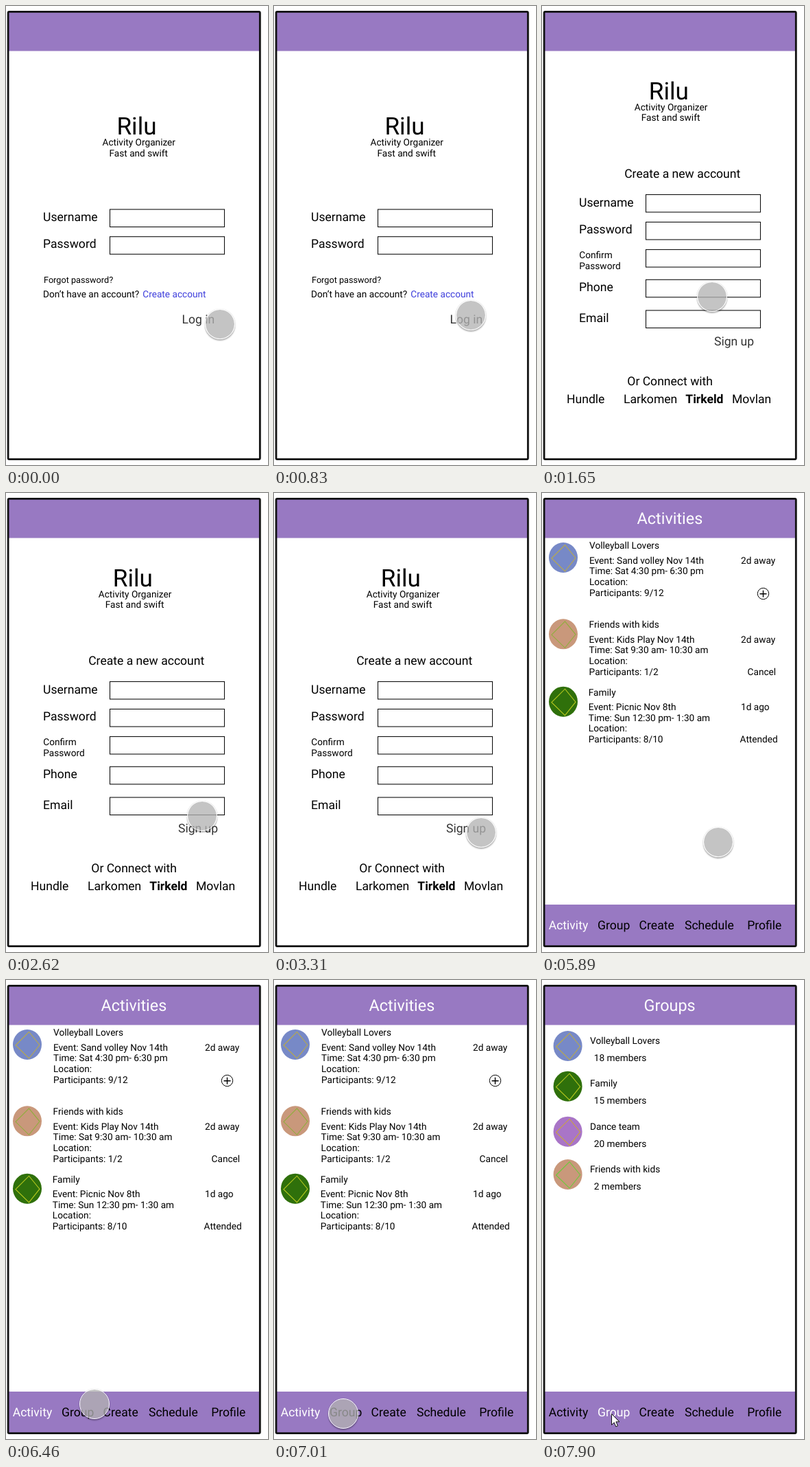
An HTML page that plays this animation: 382 px wide and 668 px high, repeating every 8 s.

```html
<!DOCTYPE html>
<html lang="en">
<head>
<meta charset="utf-8">
<title>Activity organizer walkthrough</title>
<style>
  html, body { margin: 0; width: 100%; height: 100%; overflow: hidden; background: #fff; }
  svg { position: absolute; left: 0; top: 0; display: block; }
  text { font-family: Roboto, Arial, sans-serif; white-space: pre; text-rendering: geometricPrecision; }
  #touch {
    position: absolute; left: -22px; top: -22px; width: 44px; height: 44px;
    box-sizing: border-box; border: 1px solid #fff; border-radius: 50%;
    background: rgba(178, 178, 178, .765) padding-box;
    box-shadow: 0 0 1px rgba(0, 0, 0, .35), 0 2px 2px rgba(0, 0, 0, .3);
  }
  #touch.pressed { box-shadow: 0 0 1px rgba(0, 0, 0, .35); }
</style>
</head>
<body>
<svg id="stage" width="382" height="668" viewBox="0 0 382 668"></svg>
<div id="touch"></div>
<script>
const LOOP = 8000;
const PURPLE = '#9879c2';
const XS = 12.7, S = 13.66, M = 17.57, L = 23.4, XL = 35.1;
const stage = document.getElementById('stage');
const touch = document.getElementById('touch');

function add(parent, tag, attrs, content) {
  const node = document.createElementNS('http://www.w3.org/2000/svg', tag);
  for (const key in attrs) node.setAttribute(key, attrs[key]);
  if (content) node.textContent = content;
  return parent.appendChild(node);
}

const group = () => add(stage, 'g', {});
const label = (g, x, y, size, text, fill = '#000', weight = 400) =>
  add(g, 'text', { x, y, 'font-size': size, fill, 'font-weight': weight }, text);
const bar = (g, y, height) => add(g, 'rect', { x: 4, y, width: 366, height, fill: PURPLE });
const field = (g, y) => add(g, 'rect', {
  x: 151.5, y, width: 167, height: 25.5, fill: '#fff', stroke: '#111', 'stroke-width': 1.1
});

function avatar(g, x, y, fill, line) {
  const a = add(g, 'g', { transform: `translate(${x} ${y})` });
  add(a, 'ellipse', { rx: 21, ry: 22, fill });
  add(a, 'path', { d: 'M-17 1L2.5-18.5L18 .5L2.5 20Z', fill: 'none', stroke: line, 'stroke-width': 1.1 });
}

function brand(g, x, y) {
  label(g, x, y, XL, 'Rilu');
  label(g, x - 21, y + 16, S, 'Activity Organizer');
  label(g, x - 11, y + 31.7, S, 'Fast and swift');
}

function navBar(g, active) {
  bar(g, 599, 60);
  [['Activity', 9.7], ['Group', 81], ['Create', 141.6], ['Schedule', 208], ['Profile', 299.2]]
    .forEach(([name, x]) => label(g, x, 635, M, name, name === active ? '#fff' : '#000'));
}

function login() {
  const g = group();
  brand(g, 161.5, 187);
  label(g, 54, 313, M, 'Username');
  label(g, 54, 352, M, 'Password');
  field(g, 296);
  field(g, 335.7);
  label(g, 55, 402.7, XS, 'Forgot password?');
  label(g, 54, 424, S, 'Don’t have an account?');
  label(g, 199.3, 424, S, 'Create account', '#3f3fdc');
  label(g, 256.6, 462, M, 'Log in', '#333');
  return g;
}

function signUp() {
  const g = group();
  brand(g, 155.8, 135.5);
  label(g, 120.2, 250, M, 'Create a new account');
  [['Username', 292, 274.5], ['Password', 331, 314.5], ['', 0, 354.5], ['Phone', 415, 398.3], ['Email', 459.5, 443]]
    .forEach(([name, y, top]) => { label(g, 54, y, M, name); field(g, top); });
  label(g, 54.3, 367, S, 'Confirm');
  label(g, 54.3, 382.5, S, 'Password');
  label(g, 251, 493.7, M, 'Sign up', '#333');
  label(g, 124.3, 552, M, 'Or Connect with');
  label(g, 36, 578.3, M, 'Hundle');
  label(g, 119, 578.3, M, 'Larkomen');
  label(g, 209.3, 578.3, M, 'Tirkeld', '#000', 700);
  label(g, 277, 578.3, M, 'Movlan');
  return g;
}

function activities() {
  const g = group();
  const entry = (x, y, gap, name, lines, when) => {
    label(g, x, y, S, name);
    lines.forEach((text, i) => label(g, x, y + gap + i * 15.6, S, text));
    label(g, 290, y + gap, S, when);
  };
  label(g, 138.6, 44.5, L, 'Activities', '#fff');
  avatar(g, 31, 94, '#7789c7', '#b9a94a');
  avatar(g, 31, 205.3, '#c9987b', '#8fae3c');
  avatar(g, 31, 303.7, '#2f700b', '#b5c81e');
  entry(69, 81, 21.7, 'Volleyball Lovers',
    ['Event: Sand volley Nov 14th', 'Time: Sat 4:30 pm- 6:30 pm', 'Location:', 'Participants: 9/12'], '2d away');
  entry(68.6, 196, 21.7, 'Friends with kids',
    ['Event: Kids Play Nov 14th', 'Time: Sat 9:30 am- 10:30 am', 'Location:', 'Participants: 1/2'], '2d away');
  entry(67.8, 295, 21.2, 'Family',
    ['Event: Picnic Nov 8th', 'Time: Sun 12:30 pm- 1:30 am', 'Location:', 'Participants: 8/10'], '1d ago');
  label(g, 299.6, 264.5, S, 'Cancel');
  label(g, 288.6, 363, S, 'Attended');
  add(g, 'circle', { cx: 322.5, cy: 146.5, r: 8.2, fill: 'none', stroke: '#000' });
  add(g, 'path', { d: 'M317.5 146.8h10M322.5 141.8v10', stroke: '#000', 'stroke-width': 1.4 });
  navBar(g, 'Activity');
  return g;
}

function groups() {
  const g = group();
  const entry = (y, name, count, cy, fill, line) => {
    avatar(g, 37.6, cy, fill, line);
    label(g, 70, y, S, name);
    label(g, 75.8, y + 25.3, S, `${count} members`);
  };
  label(g, 148.6, 45.3, L, 'Groups', '#fff');
  entry(93, 'Volleyball Lovers', 18, 96, '#7789c7', '#b9a94a');
  entry(154.5, 'Family', 15, 154.7, '#2f700b', '#b5c81e');
  entry(217.7, 'Dance team', 20, 220.7, '#a975c7', '#c9a63c');
  entry(280, 'Friends with kids', 2, 283, '#c9987b', '#6ccb3c');
  navBar(g, 'Group');
  add(g, 'path', {
    d: 'M101.5 631.5v16l3.7-3.5l2.6 6l2.7-1.1l-2.6-6h5Z', fill: '#fff', stroke: '#111', 'stroke-linejoin': 'round'
  });
  return g;
}

bar(stage, 9, 56.5);
const screens = [[0, login()], [1650, signUp()], [4010, activities()], [7900, groups()]];
add(stage, 'rect', {
  x: 3.1, y: 8.4, width: 367.2, height: 651.2, rx: 1.5, fill: 'none', stroke: '#111', 'stroke-width': 2.8
});

// Pointer stops: time, x, y; each holds until the next.
const stops = [
  [0, 312, 463], [130, 322, 474], [250, 332, 484], [400, 346, 501], [550, 337, 491], [680, 318, 469],
  [830, 287, 450], [950, 259, 432], [1100, 249, 424], [1250, 248, 423],
  [2620, 286, 470], [2740, 320, 511], [2890, 321, 513], [3010, 319, 510], [3160, 311, 501],
  [3310, 302, 494], [3430, 297, 492], [3580, 297, 491],
  [5890, 257, 508], [6040, 220, 532], [6190, 188, 559], [6310, 157, 586],
  [6460, 129, 617], [6590, 107, 641], [6740, 99, 643], [6890, 96, 638], [7010, 101, 631]
];
const presses = [[1500, 1650], [7750, 7900]];

const current = (list, t) => list.filter(item => item[0] <= t).pop();

function draw(t) {
  const shown = current(screens, t)[1];
  screens.forEach(([, g]) => g.setAttribute('visibility', g === shown ? 'visible' : 'hidden'));
  const [, x, y] = current(stops, t);
  touch.style.transform = `translate(${x}px, ${y}px)`;
  touch.style.visibility = t < 7900 ? 'visible' : 'hidden';
  touch.classList.toggle('pressed', presses.some(([from, to]) => t >= from && t < to));
}

const start = performance.now();
function tick() {
  draw((performance.now() - start) % LOOP);
  requestAnimationFrame(tick);
}
tick();
</script>
</body>
</html>
```
